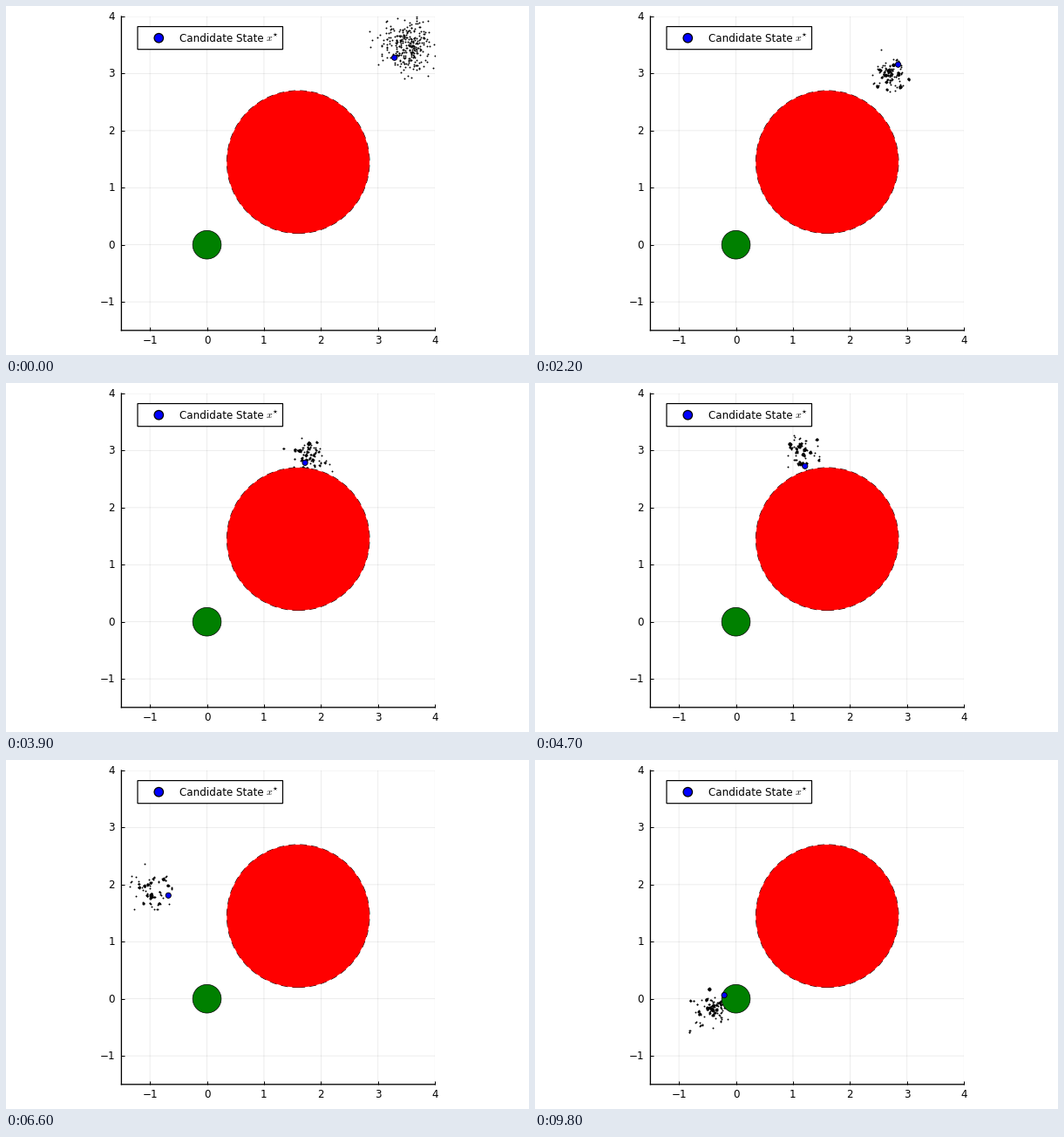
Recreate the animation shown at these times as a matplotlib script. Size 600 by 400 pixels, loop 9.9 s.

```python
import numpy as np
import matplotlib.pyplot as plt
from matplotlib.animation import FuncAnimation
from matplotlib.patches import Circle, Rectangle

W, H, DPI = 600, 400, 100
FRAMES, INTERVAL = 99, 100
PARTICLES = 300
PT = 72 / DPI  # points per pixel

LEFT, TOP, SIDE = 132.4, 12, 359.8
BOTTOM = TOP + SIDE
LOW, HIGH = -1.5, 4
SCALE = SIDE / (HIGH - LOW)
OBSTACLE, OBSTACLE_R = np.array([1.6, 1.45]), 1.25
GOAL_R = 0.25

plt.rcParams.update({"font.family": "DejaVu Sans", "mathtext.fontset": "cm",
                     "path.snap": False})

# Waypoints of the cloud's mean: step, x, y
PATH = np.array([(0, 3.5, 3.5), (12, 3.11, 3.18), (31, 2.25, 2.88),
                 (47, 1.12, 3.0), (66, -0.97, 1.87), (82, -0.76, 0.43),
                 (98, -0.44, -0.15)])


def smooth(path, steps):
    """Cubic Hermite curve through the waypoints."""
    t, pts = path[:, 0], path[:, 1:]
    slope = np.gradient(pts, t, axis=0)
    i = np.clip(np.searchsorted(t, steps, side="right") - 1, 0, len(t) - 2)
    h = (t[i + 1] - t[i])[:, None]
    u = (steps - t[i])[:, None] / h
    return ((1 + 2 * u) * (1 - u) ** 2 * pts[i]
            + u * (1 - u) ** 2 * h * slope[i]
            + u ** 2 * (3 - 2 * u) * pts[i + 1]
            + u ** 2 * (u - 1) * h * slope[i + 1])


def make_clouds(rng, centers, spreads):
    """Particle cloud per step: drift, resample, roughen."""
    shape = rng.normal(size=(PARTICLES, 2))
    clouds = [centers[0] + spreads[0] * shape]
    for center, spread in zip(centers[1:], spreads[1:]):
        shape = 0.8 * shape + rng.normal(scale=0.7, size=shape.shape)
        weight = np.exp(rng.normal(scale=2.4, size=PARTICLES))
        weight *= np.exp(-0.2 * (shape ** 2).sum(axis=1))
        shape = shape[rng.choice(PARTICLES, PARTICLES, p=weight / weight.sum())]
        shape = (shape - shape.mean(axis=0)) / shape.std(axis=0)
        noise = rng.normal(scale=0.008, size=shape.shape)
        clouds.append(center + spread * shape + noise)
    return clouds


def lean_to_obstacle(centers, steps):
    """Candidate on the obstacle's side of the cloud, hanging back early on."""
    to_obstacle = OBSTACLE - centers
    to_obstacle /= np.linalg.norm(to_obstacle, axis=1, keepdims=True)
    lean = 0.3 - 0.58 * np.exp(-((steps - 25) / 12) ** 2)
    return centers + lean[:, None] * to_obstacle


rng = np.random.default_rng(11)
steps = np.arange(FRAMES)
centers = smooth(PATH, steps)
clouds = make_clouds(rng, centers, 0.13 + 0.1 * np.exp(-steps / 4))
candidate = lean_to_obstacle(centers, steps)
candidate += rng.normal(scale=0.015, size=candidate.shape)

fig = plt.figure(figsize=(W / DPI, H / DPI), dpi=DPI, facecolor="white")
ax = fig.add_axes([LEFT / W, 1 - BOTTOM / H, SIDE / W, SIDE / H])
ax.set(xlim=(LOW, HIGH), ylim=(LOW, HIGH))
ax.set_axisbelow(True)
ax.grid(color="black", alpha=0.1, linewidth=0.7 * PT)
ax.set_xticks(range(-1, 5))
ax.set_yticks(range(-1, 5))
ax.tick_params(direction="in", length=4 * PT, width=PT,
               labelbottom=False, labelleft=False)
for side in ("top", "right"):
    ax.spines[side].set_visible(False)
for side in ("left", "bottom"):
    ax.spines[side].set_linewidth(1.3 * PT)

# Layer in pixels, above the plot, for labels and legend
page = fig.add_axes([0, 0, 1, 1], zorder=10)
page.set(xlim=(0, W), ylim=(H, 0))
page.axis("off")


def label(x, y, text, ha="left", size=11.9):
    page.text(x, y, text, ha=ha, va="baseline", fontsize=size * PT, zorder=3)


for v in range(-1, 5):
    name = str(v).replace("-", "\u2212")
    label(LEFT + (v - LOW) * SCALE, 387.3, name, "center")
    label(125, BOTTOM - (v - LOW) * SCALE + 4, name, "right")

page.add_patch(Rectangle((151, 23.6), 166.5, 26.1, facecolor="white",
                         edgecolor="black", linewidth=1.2 * PT))
page.add_patch(Circle((175.3, 36.7), 5.2, facecolor="blue",
                      edgecolor="black", linewidth=1.3 * PT, zorder=2))
label(198.9, 41, "Candidate State")
label(298, 41, r"$x^{\star}$", size=12)

# The dashed rim lies under the fill, so only its outer half shows
ax.add_patch(Circle(OBSTACLE, OBSTACLE_R, fill=False, edgecolor="black",
                    linewidth=PT, linestyle=(0, (8, 5)), zorder=3))
ax.add_patch(Circle(OBSTACLE, OBSTACLE_R, facecolor="red", edgecolor="none", zorder=4))
ax.add_patch(Circle((0, 0), GOAL_R, facecolor="green", edgecolor="black",
                    linewidth=0.7 * PT, zorder=4))

dots, = ax.plot([], [], "o", color="black", markersize=1.9 * PT,
                markeredgewidth=0, zorder=2.5)
marker = ax.add_patch(Circle(candidate[0], 3.1 / SCALE, facecolor="blue",
                             edgecolor="black", linewidth=0.9 * PT, zorder=5))


def draw(step):
    dots.set_data(*clouds[step].T)
    marker.center = candidate[step]
    return dots, marker


anim = FuncAnimation(fig, draw, frames=FRAMES, interval=INTERVAL,
                     repeat=True, repeat_delay=0, blit=False)
plt.show()
```
